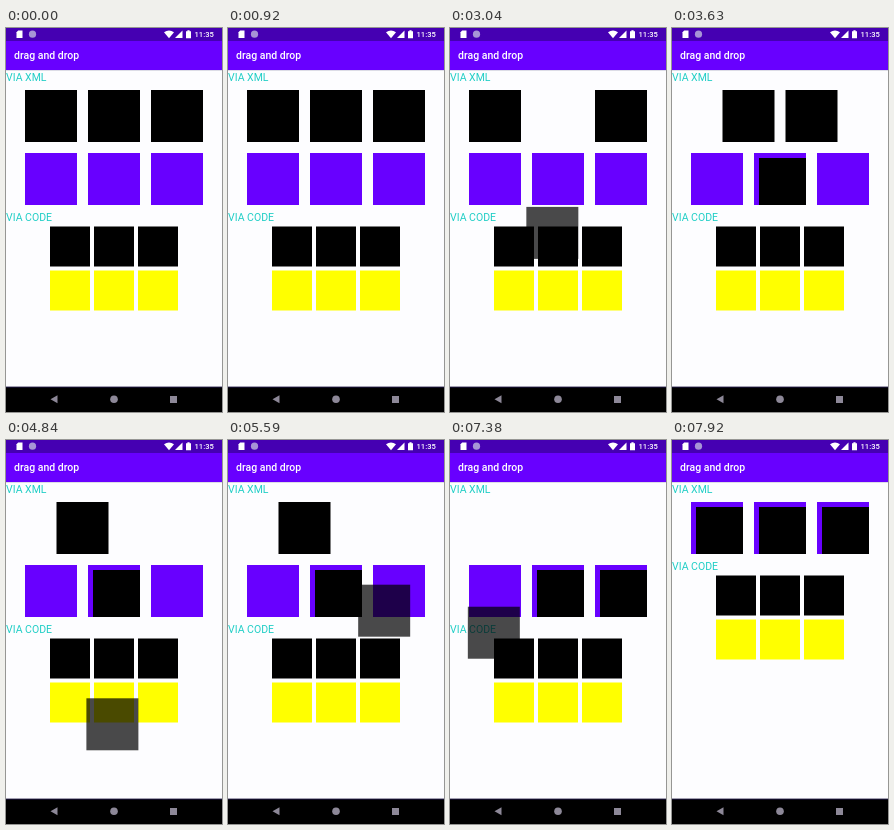
Recreate the animation shown at these times as an HTML page. Size 216 by 384 pixels, loop 8000 ms.

```html
<!DOCTYPE html>
<html lang="en">
<head>
<meta charset="utf-8">
<title>drag and drop</title>
<style>
  html, body { margin: 0; width: 100%; height: 100%; overflow: hidden; background: #fdfdff; }
  svg { display: block; width: 100vw; height: 100vh; }
  text { font-family: Roboto, sans-serif; }
  .label { font-size: 10.5px; fill: #20cec6; }
  .purple { fill: #6800ff; }
  .yellow { fill: #ffff00; }
</style>
</head>
<body>
<svg viewBox="0 0 216 384" preserveAspectRatio="none">
  <rect width="216" height="384" fill="#fdfdff"/>
  <rect class="purple" width="216" height="42"/>
  <rect width="216" height="13" fill="#4500b2"/>
  <rect y="42" width="216" height="1" fill="#dcdce6"/>

  <g fill="#fff">
    <path d="M12.2 2.5H16.5V10H10.5V4.3Z"/>
    <circle cx="26.5" cy="6.2" r="3.6" fill="#a795d6"/>
    <path d="M158 4.3Q163 .8 168 4.3L163 10.2Z"/>
    <path d="M176.5 2.5V10H169Z"/>
    <path d="M181.4 2.3H183.6V3.2H185V10.2H180V3.2H181.4Z"/>
    <text x="188.5" y="9.3" font-size="7.6" font-weight="500">11:35</text>
    <text x="8" y="31" font-size="10.5" font-weight="500">drag and drop</text>
  </g>

  <text class="label" x="0" y="53.3">VIA XML</text>
  <g id="row"></g>
  <g id="lower">
    <g id="slots"></g>
    <text class="label" x="0" y="193.3">VIA CODE</text>
    <g id="code"></g>
  </g>
  <rect id="shadow" width="52" height="52" fill-opacity=".71"/>

  <rect y="359" width="216" height="25"/>
  <rect y="358.6" width="216" height="1" fill="#1c1440"/>
  <g fill="#8d8898">
    <path d="M51.5 367.3V375.3L44.5 371.3Z"/>
    <circle cx="108" cy="371.3" r="3.8"/>
    <rect x="164" y="368" width="7" height="7"/>
  </g>
</svg>
<script>
const LOOP = 8000, SIZE = 52, STEP = 63, TOP = 62, COLLAPSE = 63;
const $ = id => document.getElementById(id);

function box(parent, x, y, size, cls) {
  const r = document.createElementNS('http://www.w3.org/2000/svg', 'rect');
  const attrs = { x, y, width: size, height: size, class: cls };
  for (const k in attrs) r.setAttribute(k, attrs[k]);
  return parent.appendChild(r);
}

// Each drag: piece in the row, slot it lands in, knots of [time, left, top]
const drags = [
  { piece: 1, slot: 1, knots: [[2690, 82, 62], [2860, 84, 112], [3080, 76, 186], [3300, 88, 158], [3520, 84, 126]] },
  { piece: 2, slot: 2, knots: [[4290, 113, 62], [4520, 111, 132], [4840, 80.5, 258], [5060, 52, 290], [5330, 78, 240], [5590, 130, 145], [5690, 142, 127]] },
  { piece: 0, slot: 0, knots: [[6520, 82, 62], [6660, 64, 132], [6840, 30.5, 227], [7020, 14, 238], [7280, 16, 192], [7500, 20, 138], [7620, 20, 130]] }
];
for (const d of drags) {
  d.start = d.knots[0][0];
  d.end = d.knots[d.knots.length - 1][0];
}

const pieces = [], drops = [];
for (let i = 0; i < 3; i++) {
  const x = 19 + i * STEP;
  pieces.push(box($('row'), x, TOP, SIZE));
  box($('slots'), x, TOP + COLLAPSE, SIZE, 'purple');
  drops.push(box($('slots'), x + 5, TOP + COLLAPSE + 5, SIZE - 5));
  box($('code'), 44 + i * 44, 198.5, 40);
  box($('code'), 44 + i * 44, 242.5, 40, 'yellow');
}

// Smooth path through timed knots (cubic Hermite)
function along(k, t, c) {
  let i = 0;
  while (i < k.length - 2 && t >= k[i + 1][0]) i++;
  const slope = j => {
    const a = k[Math.max(j - 1, 0)], b = k[Math.min(j + 1, k.length - 1)];
    return (b[c] - a[c]) / (b[0] - a[0]);
  };
  const a = k[i], b = k[i + 1], h = b[0] - a[0], u = (t - a[0]) / h;
  const s = u * u * (3 - 2 * u);
  return a[c] + (b[c] - a[c]) * s
    + h * u * (1 - u) * ((1 - u) * slope(i) - u * slope(i + 1));
}

const show = (el, on) => el.setAttribute('visibility', on ? 'visible' : 'hidden');

function draw(t) {
  const active = drags.find(d => t >= d.start && t < d.end);
  const done = drags.filter(d => t >= d.end);
  const left = [0, 1, 2].filter(i => !done.some(d => d.piece === i));

  pieces.forEach((p, i) => {
    const n = left.indexOf(i);
    show(p, n >= 0 && !(active && active.piece === i));
    if (n >= 0) p.setAttribute('x', 82 + (n - (left.length - 1) / 2) * STEP);
  });
  drops.forEach((p, i) => show(p, done.some(d => d.slot === i)));
  $('lower').setAttribute('transform', `translate(0 ${left.length ? 0 : -COLLAPSE})`);

  show($('shadow'), !!active);
  if (active) {
    $('shadow').setAttribute('x', along(active.knots, t, 1));
    $('shadow').setAttribute('y', along(active.knots, t, 2));
  }
}

const begin = performance.now();
function tick() {
  draw((performance.now() - begin) % LOOP);
  requestAnimationFrame(tick);
}
tick();
</script>
</body>
</html>
```
